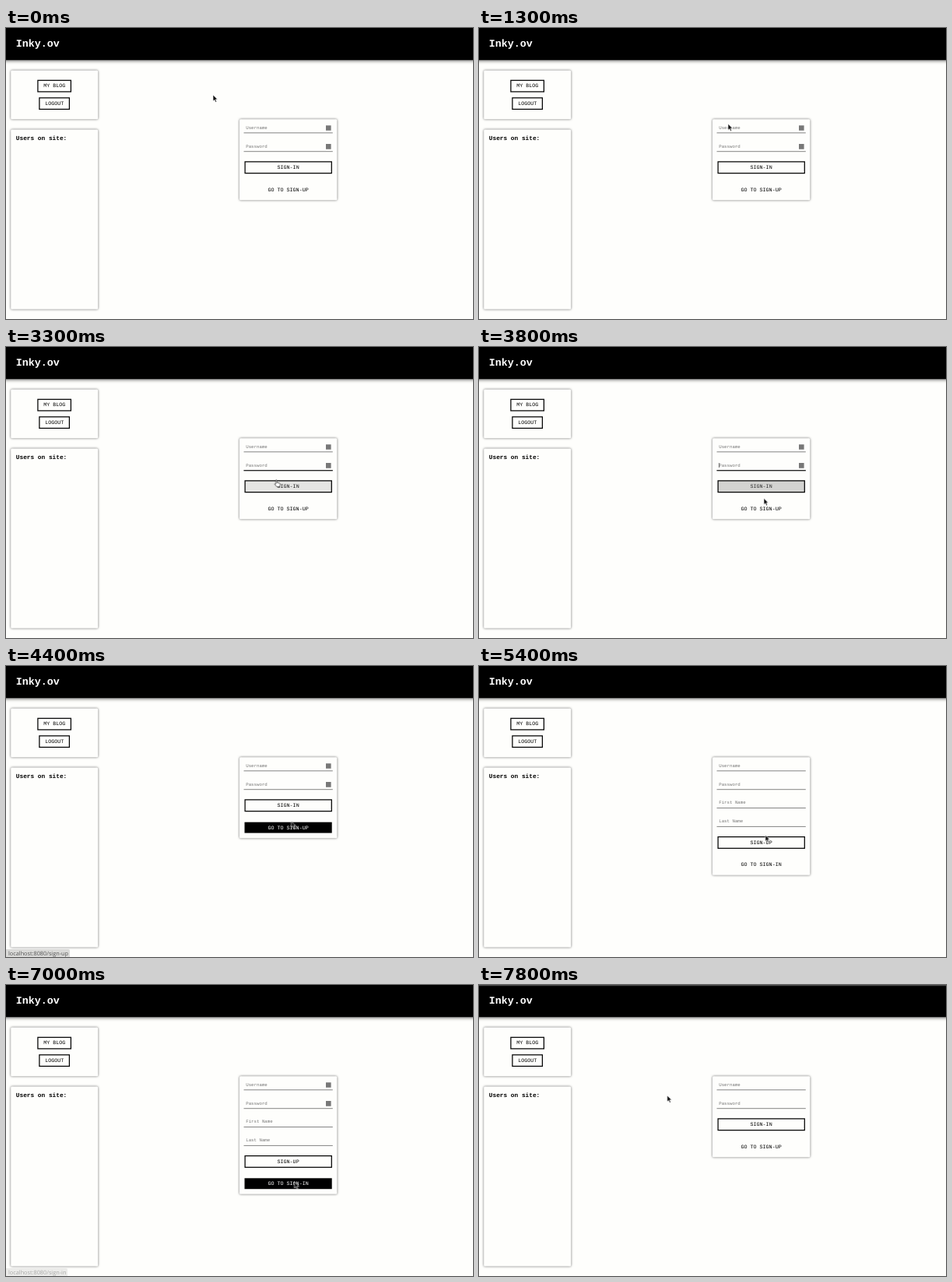
Animation, 600 px wide and 374 px high, one loop 8000 ms. Source, as an HTML page:

```html
<!DOCTYPE html>
<html lang="en">
<head>
<meta charset="utf-8">
<title>Sign in</title>
<style>
html, body { margin: 0; width: 100%; height: 100%; overflow: hidden; background: #fefefc; }
svg { display: block; width: 100vw; height: 100vh; }
text { font: 6.7px "Liberation Mono", monospace; text-rendering: geometricPrecision; }
.title { font-size: 13.33px; font-weight: bold; fill: #fff; }
.heading { font-size: 7.8px; font-weight: bold; }
.hint { font-size: 5.75px; fill: #777; }
.mid { text-anchor: middle; }
.status text { font: 7.3px "Open Sans", sans-serif; fill: #555; }
.panel { fill: #fefefc; filter: drop-shadow(0 0 1.5px #666); }
.header { filter: drop-shadow(0 1px 2px #0009); }
.button { fill: none; stroke: #000; stroke-width: 1.25; }
.line { stroke: #777; stroke-width: .9; }
.focus { stroke: #000; stroke-width: 1.1; }
.caret { stroke: #000; stroke-width: .6; }
.icon { fill: #777; }
.hover text { fill: #fff; }

/* One loop is 8 s, so 1.25% is 100 ms. */
.anim { animation: 8s step-end infinite; }
.sign-in { animation-name: sign-in; }
.sign-up { animation-name: sign-up; }
.icons { animation-name: icons; }
.user-icon { animation-name: user-icon; }
.pass-icon { animation-name: pass-icon; }
.user-focus { animation-name: user-focus; }
.pass-focus { animation-name: pass-focus; }
.user-caret { animation-name: user-caret; }
.pass-caret { animation-name: pass-caret; }
.submit-hover { animation-name: submit-hover; }
.to-up-hover { animation-name: to-up-hover; }
.to-in-hover { animation-name: to-in-hover; }
.to-up-status { animation-name: to-up-status; }
.to-in-status { animation-name: to-in-status; }
.load-line { animation-name: load-line; }
.cursor { animation-name: cursor; }
.arrow { animation-name: arrow; }
.beam { animation-name: beam; }
.hand { animation-name: hand; }

@keyframes sign-in { 0%, 88.75%, 100% { opacity: 1 } 62.5% { opacity: 0 } }
@keyframes sign-up { 0%, 88.75%, 100% { opacity: 0 } 62.5% { opacity: 1 } }
@keyframes icons { 0%, 73.75% { opacity: 1 } 62.5%, 88.75%, 100% { opacity: 0 } }
@keyframes user-icon { 0%, 27.5%, 100% { opacity: 0 } 17.5% { opacity: 1 } }
@keyframes pass-icon { 0%, 38.75%, 100% { opacity: 0 } 28.75% { opacity: 1 } }
@keyframes user-focus { 0%, 33.75%, 100% { opacity: 0 } 21.25%, 32.5% { opacity: .5 } 22.5% { opacity: 1 } }
@keyframes pass-focus { 0%, 55%, 100% { opacity: 0 } 32.5%, 53.75% { opacity: .5 } 33.75% { opacity: 1 } }
@keyframes user-caret { 0%, 27.5%, 100% { opacity: 0 } 21.25% { opacity: 1 } }
@keyframes pass-caret { 0%, 38.75%, 51.25%, 100% { opacity: 0 } 32.5%, 45% { opacity: 1 } }
@keyframes submit-hover {
  0%, 48.75%, 100% { opacity: 0 }
  41.25% { opacity: .1 } 42.5% { opacity: .4 } 43.75% { opacity: .85 }
  45% { opacity: 1 } 46.25% { opacity: .6 } 47.5% { opacity: .17 }
}
@keyframes to-up-hover {
  0%, 62.5%, 100% { opacity: 0 }
  48.75% { opacity: .22 } 50% { opacity: .6 } 51.25% { opacity: .9 } 52.5% { opacity: 1 }
}
@keyframes to-in-hover {
  0%, 88.75%, 100% { opacity: 0 }
  71.25% { opacity: .22 } 72.5% { opacity: .6 } 73.75% { opacity: .9 } 75% { opacity: 1 }
}
@keyframes to-up-status { 0%, 62.5%, 100% { opacity: 0 } 51.25%, 61.25% { opacity: .5 } 52.5% { opacity: 1 } }
@keyframes to-in-status { 0%, 88.75%, 100% { opacity: 0 } 73.75%, 87.5% { opacity: .5 } 75% { opacity: 1 } }
@keyframes load-line { 0%, 73.75% { opacity: 0 } 68.75%, 95%, 100% { opacity: 1 } }
@keyframes cursor {
  0% { transform: translate(266px, 86px) }
  7.5% { transform: translate(266px, 86px); animation-timing-function: steps(4, start) }
  12.5% { transform: translate(300px, 104px); animation-timing-function: steps(5, start) }
  18.75% { transform: translate(325px, 128px); animation-timing-function: steps(1, start) }
  20% { transform: translate(324.5px, 126.5px) }
  26.25% { transform: translate(324.5px, 126.5px); animation-timing-function: steps(4, start) }
  31.25% { transform: translate(333.5px, 157px) }
  38.75% { transform: translate(333.5px, 157px); animation-timing-function: steps(8, start) }
  48.75% { transform: translate(366px, 194.5px); animation-timing-function: steps(1, start) }
  50% { transform: translate(366.5px, 199.5px) }
  67.5% { transform: translate(366.5px, 199.5px); animation-timing-function: steps(3, start) }
  71.25% { transform: translate(370.5px, 253px) }
  93.75% { transform: translate(370.5px, 253px); animation-timing-function: steps(4, start) }
  98.75%, 100% { transform: translate(241.7px, 142px) }
}
@keyframes arrow {
  0%, 27.5%, 38.75%, 46.25%, 55%, 81.25%, 100% { opacity: 1 }
  17.5%, 28.75%, 41.25%, 48.75%, 70% { opacity: 0 }
}
@keyframes beam { 0%, 27.5%, 38.75%, 100% { opacity: 0 } 17.5%, 28.75% { opacity: 1 } }
@keyframes hand { 0%, 46.25%, 55%, 81.25%, 100% { opacity: 0 } 41.25%, 48.75%, 70% { opacity: 1 } }
</style>
</head>
<body>
<svg viewBox="0 0 600 374" preserveAspectRatio="none">
  <rect width="600" height="374" fill="#fefefc"/>
  <rect class="header" x="-10" y="-10" width="620" height="51.2"/>
  <rect class="load-line anim" width="600" height="1.2" fill="#4a4a4a"/>
  <text class="title" x="12.8" y="24.4">Inky.ov</text>

  <rect class="panel" x="6.2" y="54.6" width="112" height="62.6" rx="1.5"/>
  <rect class="button" x="40.9" y="67.3" width="42.5" height="14.6"/>
  <text class="mid" x="62.2" y="76.4">MY BLOG</text>
  <rect class="button" x="42.9" y="89.8" width="38.5" height="14.6"/>
  <text class="mid" x="62.2" y="98.9">LOGOUT</text>
  <rect class="panel" x="6.2" y="130.5" width="112" height="231" rx="1.5"/>
  <text class="heading" x="12.8" y="143.9">Users on site:</text>

  <g class="sign-in anim">
    <rect class="panel" x="300" y="117.2" width="125.3" height="104" rx="1.5"/>
    <text class="mid" x="362.6" y="181.4">SIGN-IN</text>
    <g class="submit-hover hover anim">
      <rect x="307" y="172" width="111.3" height="14.6"/>
      <text class="mid" x="362.6" y="181.4">SIGN-IN</text>
    </g>
    <rect class="button" x="307.1" y="171.9" width="111.2" height="14.7"/>
    <text class="mid" x="362.6" y="209.9">GO TO SIGN-UP</text>
    <g class="to-up-hover hover anim">
      <rect x="306.5" y="200.7" width="112.2" height="13.9"/>
      <text class="mid" x="362.6" y="209.9">GO TO SIGN-UP</text>
    </g>
  </g>

  <g class="sign-up anim">
    <rect class="panel" x="300" y="117.2" width="125.3" height="151.6" rx="1.5"/>
    <text class="hint" x="308.2" y="177.4">First Name</text>
    <path class="line" d="M305.5 182.5h114.3"/>
    <text class="hint" x="308.2" y="201.2">Last Name</text>
    <path class="line" d="M305.5 206.4h114.3"/>
    <rect class="button" x="307.1" y="219.6" width="111.2" height="14.7"/>
    <text class="mid" x="362.6" y="229">SIGN-UP</text>
    <text class="mid" x="362.6" y="257.2">GO TO SIGN-IN</text>
    <g class="to-in-hover hover anim">
      <rect x="306.5" y="248.3" width="112.2" height="13.9"/>
      <text class="mid" x="362.6" y="257.2">GO TO SIGN-IN</text>
    </g>
  </g>

  <text class="hint" x="308.2" y="129.6">Username</text>
  <path class="line" d="M305.5 134.8h114.3"/>
  <path class="user-focus focus anim" d="M305.5 134.8h114.3"/>
  <path class="user-caret caret anim" d="M308.4 124.8v6"/>
  <text class="hint" x="308.2" y="153.6">Password</text>
  <path class="line" d="M305.5 158.7h114.3"/>
  <path class="pass-focus focus anim" d="M305.5 158.7h114.3"/>
  <path class="pass-caret caret anim" d="M308.4 149v6"/>
  <g class="icons anim">
    <path class="icon" d="M411 125.2h6.6v6.6h-6.6zm0 23.9h6.6v6.6h-6.6z"/>
    <path class="user-icon anim" d="M411 125.2h6.6v6.6h-6.6z"/>
    <path class="pass-icon anim" d="M411 149.1h6.6v6.6h-6.6z"/>
  </g>

  <g class="to-up-status status anim">
    <path fill="#dadad8" d="M0 364h80q2 0 2 2v8H0z"/>
    <text x="3" y="372">localhost:8080/sign-up</text>
  </g>
  <g class="to-in-status status anim">
    <path fill="#dadad8" d="M0 364h77q2 0 2 2v8H0z"/>
    <text x="3" y="372">localhost:8080/sign-in</text>
  </g>

  <g class="cursor anim">
    <path class="arrow anim" d="M0 0V8L1.9 6.4 3.2 9.3 4.6 8.7 3.3 5.8H5.8Z" fill="#111" stroke="#fff" stroke-width=".6"/>
    <path class="beam anim" d="M-2-4.5h1.5l.5.5.5-.5H2M0-4V4M-2 4.5h1.5L0 4l.5.5H2" fill="none" stroke="#333" stroke-width=".8"/>
    <path class="hand anim" d="M1 0q1-.8 1.4.2V3.2L5.6 4q1 .3 .9 1.3L6 8.6H2.2L-.6 5.2q.2-1 1.6 0Z" fill="#fff" stroke="#222" stroke-width=".7"/>
  </g>
</svg>
</body>
</html>
```
